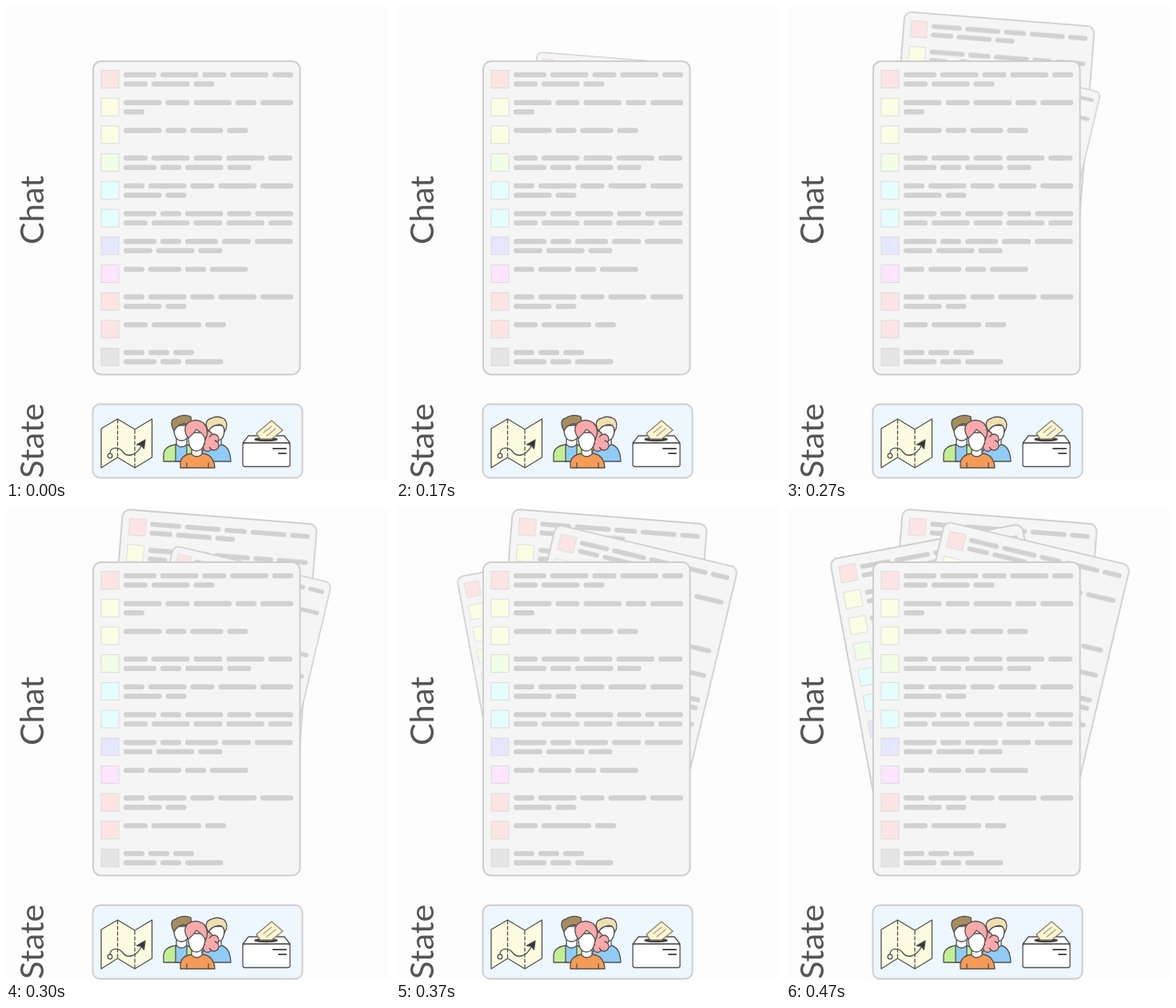
Recreate the animation shown at these times as an HTML page. Size 480 px wide and 591 px high, loop 510 ms.

```html
<!DOCTYPE html>
<html lang="en">
<head>
<meta charset="utf-8">
<title>Chat and state</title>
<style>
  html, body { margin: 0; width: 100%; height: 100%; overflow: hidden; background: #fdfdfd; }
  svg { display: block; width: 480px; height: 591px; }
  text { font: 41.5px Lato, "Open Sans", sans-serif; fill: #555; }
  .panel { stroke: #cecece; stroke-width: 2; }
  .bars { stroke: #d1d1d1; stroke-width: 6.5; stroke-linecap: round; }
  .icon { stroke: #505050; stroke-width: 1.3; stroke-linejoin: round; stroke-linecap: round; fill: none; }
  .skin { fill: #fff; }
  .pink { fill: #f9a9aa; }
</style>
</head>
<body>
<svg viewBox="0 0 480 591" xmlns="http://www.w3.org/2000/svg">
  <defs>
    <g id="card"><rect class="panel" x="109" y="69" width="258.5" height="391.5" rx="10" fill="#f5f5f5"/></g>
  </defs>

  <text transform="translate(47 298) rotate(-90)">Chat</text>
  <text transform="translate(46.5 590) rotate(-90)">State</text>

  <g id="fan"></g>
  <use href="#card"/>

  <rect class="panel" x="108.5" y="497.5" width="262" height="92" rx="9" fill="#eef6fe"/>

  <!-- map -->
  <g class="icon">
    <path fill="#fdfbe1" d="M119 528 139.500 516 161 529 182.500 516V564L161 577 139.500 564 119 577Z"/>
    <path stroke-dasharray="4 3" d="M139.500 517V563M161 530V576"/>
    <circle cx="130" cy="562" r="2.800" fill="#fdfbe1"/>
    <path d="M130 559C130 551 141 550 146 557S163 563 170 548"/>
    <path fill="#333" d="M174 542 172.500 553 169 549 163.500 548Z"/>
  </g>

  <!-- people -->
  <g class="icon">
    <path fill="#c4ee94" d="M197 569V560Q198 550 212 548H226Q236 550 237 569Z"/>
    <path fill="#90ccf5" d="M212 569V548H226V569Z"/>
    <path class="skin" d="M213 541V548Q219 554 226 548V541Z"/>
    <path class="skin" d="M210 524V531Q211 543 219.500 543T229 531V524Z"/>
    <path fill="#a68c5e" d="M210 531Q203 517 212 515 221 509 231 513 233 524 229 530 229 522 222 522 213 524 210 531Z"/>
    <path fill="#90ccf5" d="M243 569Q244 550 257 548H269Q280 550 281 569Z"/>
    <path class="skin" d="M257 540V548Q263 553 269 548V540Z"/>
    <path class="skin" d="M254 524V531Q255 543 263.500 543T273 531V524Z"/>
    <path fill="#f0dfb0" d="M253 531Q246 518 257 515 265 511 273 516 279 523 273 532 273 523 266 523 257 524 253 531Z"/>
    <g class="pink">
      <circle cx="252" cy="537" r="6"/><circle cx="260" cy="541" r="6"/>
      <circle cx="252" cy="551" r="5.500"/><circle cx="260" cy="549" r="6"/>
      <circle cx="255" cy="545" r="6" stroke="none"/>
    </g>
    <path fill="#f69b56" d="M218 577V571Q219 561 232 559H246Q260 561 261 577Z"/>
    <path class="skin" d="M232 553V560Q238 566 245 560V553Z"/>
    <path class="skin" d="M228 533V541Q229 556 238 556T249 541V533Z"/>
    <path class="pink" d="M228 540Q220 529 227 521 237 514 247 521 255 530 249 542 249 536 238 529 234 535 228 540Z"/>
    <path d="M226 577V571M253 577V571"/>
  </g>

  <!-- ballot box -->
  <g class="icon">
    <path class="skin" d="M303 537H348L355 546H296Z"/>
    <ellipse cx="325" cy="541.500" rx="14" ry="2" fill="#333"/>
    <path fill="#fdf6d2" stroke="#8b836c" d="M313 534 332 518 346 530 332 541H318Z"/>
    <path stroke="#a79f88" d="M322 533 332 525M326 537 337 528"/>
    <rect class="skin" x="296" y="546" width="59" height="29.500" rx="2.500"/>
    <path stroke-width="2" d="M334 553H350M341 559H350"/>
  </g>
</svg>

<script>
const LOOP = 510;
const FRAMES = 15;

function add(parent, tag, attrs) {
  const el = document.createElementNS('http://www.w3.org/2000/svg', tag);
  for (const k in attrs) el.setAttribute(k, attrs[k]);
  return parent.appendChild(el);
}

const pink = '#fde5e5', yellow = '#fdfde5', green = '#f1fde6', cyan = '#e5fdfd',
      blue = '#e5e8fd', violet = '#fce5fd', grey = '#e5e5e5';

// One letter per word, from short to extra long; a space starts a new line
const WORD = { s: 26, m: 30, k: 36, l: 41, x: 47.5, z: 62 };
const GAP = 5;
const messages = [
  [pink, 'lxmxs mxs'], [yellow, 'xmxsl s'], [yellow, 'xsls'], [green, 'mxkxm lsxm'],
  [cyan, 'sxmxl xs'], [cyan, 'lsxmx mxkxm'], [blue, 'lslkx kxm'], [violet, 'slsx'],
  [pink, 'sxmxl xs'], [pink, 'mzs'], [grey, 'sss lsx']
];

const card = document.getElementById('card');
messages.forEach(([fill, text], i) => {
  const y = 86 + 34.7 * i;
  add(card, 'rect', { x: 119, y: y - 5.5, width: 22, height: 22, fill, stroke: '#dcdcdc' });
  let d = '';
  text.split(' ').forEach((line, row) => {
    let x = 147;
    for (const c of line) {
      d += `M${x + 3.2} ${y + row * 11.6}h${WORD[c] - 6.4}`;
      x += WORD[c] + GAP;
    }
  });
  add(card, 'path', { d, class: 'bars' });
});

// Cards grow out from behind the front one, back to front
const fan = [
  { x: 253, y: 196, turn: 4.5, size: 0.943, start: -77, end: 308 },
  { x: 208.6, y: 225, turn: -10.6, size: 0.945, start: 48, end: 473 },
  { x: 272.8, y: 221, turn: 13.4, size: 0.922, start: -18, end: 407 }
];

const clamp = u => Math.min(1, Math.max(0, u));
const easeInOut = u => (1 - Math.cos(Math.PI * clamp(u))) / 2;

for (const { x, y, turn, size, start, end } of fan) {
  const el = add(document.getElementById('fan'), 'use', { href: '#card' });
  const steps = [];
  for (let i = 0; i <= FRAMES; i++) {
    // 30 frames a second, on whole hundredths
    const t = i < FRAMES ? Math.round(i * 10 / 3) * 10 : LOOP;
    const scale = size * easeInOut((t - start) / (end - start));
    steps.push({
      offset: t / LOOP,
      easing: 'steps(1)',
      transform: `translate(${x}px, ${y}px) rotate(${turn}deg) scale(${scale}) translate(-238.25px, -264.75px)`
    });
  }
  el.animate(steps, { duration: LOOP, iterations: Infinity });
}
</script>
</body>
</html>
```
